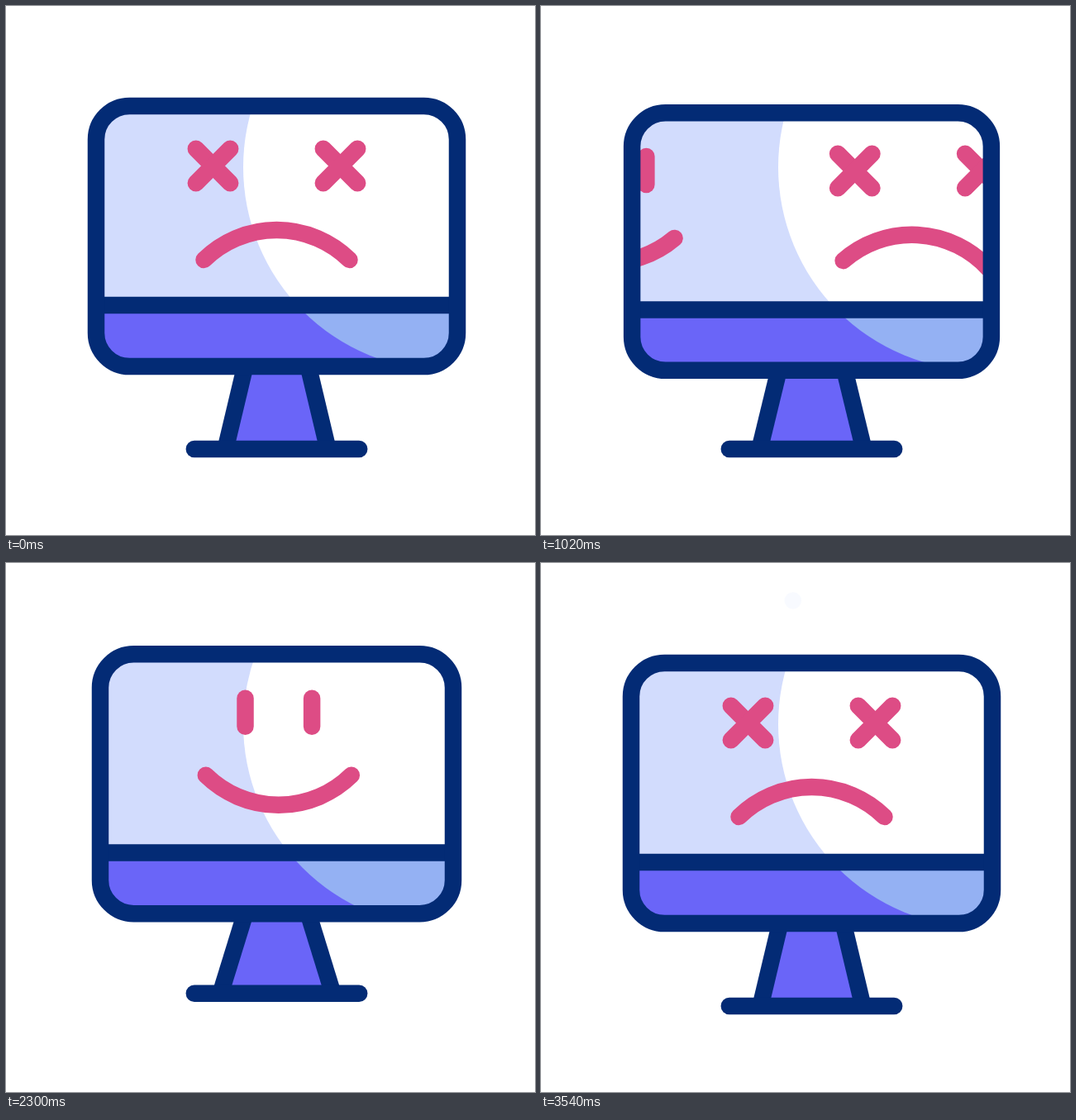
Recreate the animation shown at these times as an HTML page with a canvas. Size 640 px wide and 640 px high, loop 3600 ms.

```html
<!DOCTYPE html>
<html lang="en">
<head>
<meta charset="utf-8">
<title>Moody monitor</title>
<style>
  html, body { margin: 0; width: 100%; height: 100%; overflow: hidden; background: #fff; }
  canvas { display: block; width: 100vw; height: 100vh; }
</style>
</head>
<body>
<canvas id="stage" width="640" height="640"></canvas>
<script>
const ctx = document.getElementById('stage').getContext('2d');
const { PI, sin, cos, max, min, sqrt, asin } = Math;
const LOOP = 3600, CX = 327.5, LINE = 20.5, GAP = 369.7;
const NAVY = '#032b75', PURPLE = '#6a65f8', BLUE = '#94b1f3', PALE = '#d2dcfd',
  PINK = '#dd4c85', YELLOW = '#fecc50';

const ramp = (t, a, b) => min(1, max(0, (t - a) / (b - a)));
const ease = (t, a, b) => { const u = ramp(t, a, b); return u * u * (3 - 2 * u); };
const arch = (t, a, b) => sin(PI * ramp(t, a, b));

// Crouch, hop, land, recover: time and drop of the top edge
const DROP = [[0, 0], [300, 39], [515, -20], [760, 33], [970, 0]];
const dropAt = t => DROP.reduce((y, [at, to], i) =>
  i ? y + (to - DROP[i - 1][1]) * ease(t, DROP[i - 1][0], at) : to, 0);

// One full swing that dies away
function swing(t, start, time, size) {
  const u = ramp(t, start, start + time);
  return size * (1 - u) ** 2 * sin(2 * PI * u);
}

function line(x1, y1, x2, y2) {
  ctx.beginPath();
  ctx.moveTo(x1, y1);
  ctx.lineTo(x2, y2);
  ctx.stroke();
}

function disc(color) {
  ctx.fillStyle = color;
  ctx.beginPath();
  ctx.arc(533, 195, 246, 0, 7);
  ctx.fill();
}

// dir 1 frowns, -1 smiles; tilts in degrees around a point above it
function mouth(x, y, dir, tilt, pivot) {
  const r = 125.6, half = asin(88 / r), mid = -PI / 2 * dir;
  ctx.save();
  ctx.translate(x, pivot);
  ctx.rotate(tilt * PI / 180);
  ctx.beginPath();
  ctx.arc(0, y - pivot + dir * (r - 36), r, mid - half, mid + half);
  ctx.stroke();
  ctx.restore();
}

function faces(t, dy) {
  const shift = 372 * (ease(t, 817, 1331) - ease(t, 2436, 3271));
  const hx = CX - GAP;
  ctx.save();
  ctx.translate(shift, dy);
  ctx.strokeStyle = PINK;
  ctx.lineCap = 'round';
  for (const side of [-1, 1]) {
    const x = CX + side * 77, arm = 20.7;
    line(x - arm, 193.5 - arm, x + arm, 193.5 + arm);
    line(x + arm, 193.5 - arm, x - arm, 193.5 + arm);
    line(hx + side * 40.3, 176, hx + side * 40.3, 210);
  }
  mouth(CX, 307, 1, 9.2 * arch(t, 120, 1130) + swing(t, 2700, 840, 16), 246);
  mouth(hx, 269, -1, swing(t, 930, 770, 8), 88);
  ctx.restore();
}

function monitor(t) {
  const tau = t < 1500 ? t - 120 : t - 1840;
  const drop = dropAt(tau), squash = max(0, drop), air = ramp(tau, 360, 775);
  const top = 121 + drop, bottom = 436 + drop * (drop > 0 ? .57 : 1.1);
  const bar = top + (bottom - top) * 241 / 315;
  const half = 218.5 + 1.5 * arch(tau, 0, 300) - 5 * sin(PI * sqrt(ramp(tau, 280, 1000)));
  const left = CX - half, width = half * 2;
  const base = 536 - 22 * sin(PI * air);
  const hip = 38.2 + .2 * squash, foot = 62 + .12 * squash + 6 * sin(2 * PI * air);

  ctx.lineWidth = LINE;
  ctx.lineCap = 'butt';
  ctx.strokeStyle = NAVY;
  ctx.fillStyle = PURPLE;
  ctx.beginPath();
  ctx.moveTo(CX - hip, bottom);
  ctx.lineTo(CX - foot, base);
  ctx.lineTo(CX + foot, base);
  ctx.lineTo(CX + hip, bottom);
  ctx.fill();
  for (const side of [-1, 1]) line(CX + side * hip, bottom, CX + side * foot, base);
  ctx.lineCap = 'round';
  line(CX - 99.7, base, CX + 99.7, base);

  const frame = new Path2D();
  frame.roundRect(left, top, width, bottom - top, 40.5);
  ctx.save();
  ctx.clip(frame);
  ctx.fillStyle = PALE;
  ctx.fillRect(left, top, width, bottom - top);
  disc('#fff');
  faces(t, 1.06 * (bar - 362));
  ctx.beginPath();
  ctx.rect(left, bar, width, bottom - bar);
  ctx.clip();
  ctx.fillStyle = PURPLE;
  ctx.fillRect(left, bar, width, bottom - bar);
  disc(BLUE);
  ctx.restore();

  ctx.strokeStyle = NAVY;
  ctx.lineCap = 'butt';
  line(left, bar, left + width, bar);
  ctx.stroke(frame);
}

// A wave of three half periods, drawn at its head and erased at its tail
function puff(t, x, y, start, lag, fade) {
  const time = 555;
  const head = 3 * ramp(t, start, start + time);
  const tail = 3 * ramp(t, start + lag, start + lag + time);
  const wave = () => {
    ctx.beginPath();
    for (let i = 0; i <= 40; i++) {
      const s = tail + (head - tail) * i / 40;
      ctx.lineTo(x + 17.4 * (1 - cos(s * PI)), y - 31.3 * s - i * .0005);
    }
    ctx.stroke();
  };
  if (!head) return;
  ctx.lineCap = ctx.lineJoin = 'round';
  ctx.strokeStyle = PALE;
  ctx.globalAlpha = 1 - ramp(t, fade, fade + 200);
  wave();
  ctx.strokeStyle = YELLOW;
  ctx.globalAlpha = 1 - ramp(t, fade, fade + 100);
  wave();
  ctx.globalAlpha = 1;
}

function draw(t) {
  ctx.fillStyle = '#fff';
  ctx.fillRect(0, 0, 640, 640);
  monitor(t);
  puff(t, 335.5, 87, 2530, 335, 3140);
  puff(t, 270, 139.5, 2645, 205, 3370);
}

const start = performance.now();
function tick() {
  draw((performance.now() - start) % LOOP);
  requestAnimationFrame(tick);
}
tick();
</script>
</body>
</html>
```
